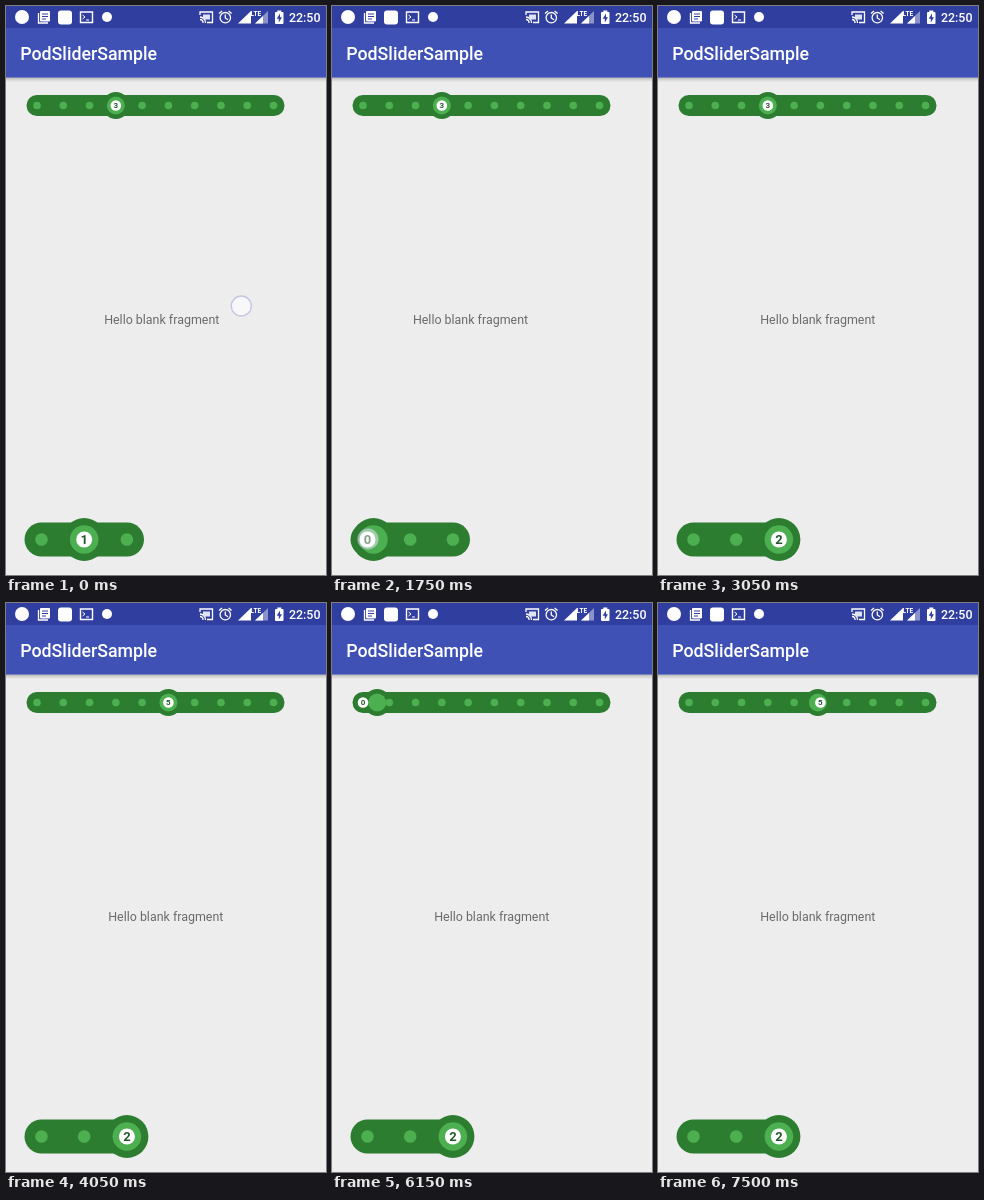
Animation, 320 px wide and 569 px high, one loop 7.55 s. Source, as an HTML page with a canvas:

```html
<!DOCTYPE html>
<html lang="en">
<head>
<meta charset="utf-8">
<title>Pod slider</title>
<style>
  html, body { margin: 0; width: 100%; height: 100%; overflow: hidden; background: #ededed; }
  canvas { display: block; }
</style>
</head>
<body>
<canvas id="stage" width="320" height="569"></canvas>
<script>
const ctx = document.getElementById('stage').getContext('2d');
const LOOP = 7550, GLIDE = 600, RELEASE = 150;
const DARK = '#2d7d31', GREEN = '#4caf50', WHITE = '#fff';

const topSlider = {
  x: 31, y: 99.5, gap: 26.28, count: 10, left: 20.5, right: 278.5, half: 10.5,
  big: 13.4, mid: 9, dot: 3.8, white: 5.3, font: 8, first: 3,
  moves: [[3500, 5], [4594, 9], [5786, 0], [6450, 4], [7175, 5]]
};
const bottomSlider = {
  x: 35.5, y: 533.5, gap: 42.7, count: 3, left: 18.5, right: 138, half: 17,
  big: 21.5, mid: 14.3, dot: 6.3, white: 8, font: 13, first: 1,
  moves: [[RELEASE, 2], [1000, 1], [1462, 0], [2500, 2]]
};
const pageMoves = [[RELEASE, 2], [1000, 1], [1500, 0], [2500, 2]];

// x, y, finger down, finger up
const taps = [
  [78, 533, 950, 1150], [36, 533, 1430, 1720], [121, 533, 2480, 2680],
  [163, 101, 3450, 3650], [274, 101, 4550, 4750],
  [31, 101, 5690, 5930], [138, 101, 6400, 6600], [165, 101, 7130, 7330]
];

const clamp = v => Math.min(1, Math.max(0, v));
const easeOut = (t, power) => 1 - (1 - clamp(t)) ** power;
const glide = (moves, first, t, power) => moves.reduce(
  (v, [start, to]) => v + (to - v) * easeOut((t - start) / GLIDE, power), first);
const selected = (moves, first, t) => moves.reduce((v, [start, to]) => t >= start ? to : v, first);
const dragPage = t => 1.012 + 0.45 * clamp(t / RELEASE) ** 1.3;

function circle(x, y, r, fill) {
  ctx.beginPath();
  ctx.arc(x, y, r, 0, 7);
  ctx.fillStyle = fill;
  ctx.fill();
}

function box(x, y, w, h, r, fill) {
  ctx.beginPath();
  ctx.roundRect(x, y, w, h, r);
  ctx.fillStyle = fill;
  ctx.fill();
}

function text(str, x, y, font, fill, align = 'center') {
  ctx.font = font + ' Roboto, sans-serif';
  ctx.textAlign = align;
  ctx.fillStyle = fill;
  ctx.fillText(str, x, y);
}

function path(d, stroke, width = 1.3) {
  const shape = new Path2D(d);
  if (stroke) {
    ctx.strokeStyle = stroke;
    ctx.lineWidth = width;
    ctx.stroke(shape);
  } else ctx.fill(shape);
}

function drawStatusBar() {
  box(0, 0, 320, 22, 0, '#303f9f');
  circle(16, 11, 7, WHITE);
  path('M32.5 7V17H42', WHITE);
  box(34, 5, 10, 10.5, 1, WHITE);
  path('M36 8H42M36 10.5H42M36 13H40', '#303f9f', 1);
  box(52, 4.5, 14, 14, 3, WHITE);
  path('M74.5 6H86.5V16.5H74.5Z', WHITE, 1.4);
  path('M76.5 9L79 11L76.5 13M80 14H83', WHITE, 1);
  circle(101, 11, 5, WHITE);

  path('M194 9V6H206.5V16.5H201M194 11A5.5 5.5 0 0 1 199.5 17M194 13.5A3 3 0 0 1 197 17', WHITE);
  box(197, 8.5, 7, 5, 0, '#dfe2f3');
  path('M224.5 11.7A5.2 5.2 0 1 0 214.1 11.7A5.2 5.2 0 1 0 224.5 11.7M219.3 8.5V12L222 13.7M213 7.5L216 5M225.6 7.5L222.6 5', WHITE);
  ctx.fillStyle = WHITE;
  path('M232 17.5L245 5V17.5Z');
  ctx.fillStyle = '#8a93ca';
  path('M249 17.5L262 5V17.5Z');
  ctx.fillStyle = WHITE;
  path('M249 17.5L257 10V17.5Z');
  text('LTE', 249.8, 10, 'bold 6.5px', WHITE);
  box(269, 6, 8.5, 12, 1, WHITE);
  box(271.3, 4.5, 4, 2, 0, WHITE);
  ctx.fillStyle = '#303f9f';
  path('M274 7.5L270.7 12.7H272.8V16.5L276 11.3H274Z');
  text('22:50', 314.5, 16, '500 12.44px', WHITE, 'right');
}

function drawHeader() {
  const shadow = ctx.createLinearGradient(0, 71, 0, 76);
  shadow.addColorStop(0, 'rgba(0,0,0,.24)');
  shadow.addColorStop(1, 'rgba(0,0,0,0)');
  box(0, 71, 320, 5, 0, shadow);
  box(0, 21, 320, 50.5, 0, '#3f51b5');
  drawStatusBar();
  text('PodSliderSample', 14.2, 54, '500 17.78px', WHITE, 'left');
}

function drawSlider(s, t) {
  const podX = i => s.x + i * s.gap;
  const knob = podX(glide(s.moves, s.first, t, 3));
  const current = selected(s.moves, s.first, t);
  box(s.left, s.y - s.half, s.right - s.left, s.half * 2, s.half, DARK);
  circle(knob, s.y, s.big, DARK);
  circle(knob, s.y, s.mid, GREEN);
  for (let i = 0; i < s.count; i++) {
    if (i !== current) circle(podX(i), s.y, s.dot, GREEN);
  }
  circle(podX(current), s.y, s.white, WHITE);
  text(current, podX(current), s.y + s.font * 0.36, `bold ${s.font}px`, '#23592a');
}

function drawTouch(x, y, alpha) {
  if (alpha <= 0) return;
  ctx.globalAlpha = alpha;
  circle(x, y, 10, 'rgba(250,250,254,.8)');
  ctx.strokeStyle = '#c3c6e2';
  ctx.lineWidth = 1.4;
  ctx.stroke();
  ctx.globalAlpha = 1;
}

function draw(t) {
  box(0, 0, 320, 569, 0, '#ededed');
  const drag = dragPage(t);
  const page = glide(pageMoves, drag, t, 5);
  for (let i = 0; i < 3; i++) {
    text('Hello blank fragment', 159.8 + (i - page) * 320, 317.5, '12.44px', '#6b6b6b');
  }
  drawHeader();
  drawSlider(topSlider, t);
  drawSlider(bottomSlider, t);
  drawTouch(235.5 - (drag - 1.012) * 320, 300, 1 - clamp((t - RELEASE) / 80));
  for (const [x, y, down, up] of taps) {
    if (t >= down) drawTouch(x, y, 1 - clamp((t - up) / 70));
  }
}

function tick() {
  draw((performance.now() - start) % LOOP);
  requestAnimationFrame(tick);
}
const start = performance.now();
tick();
</script>
</body>
</html>
```
